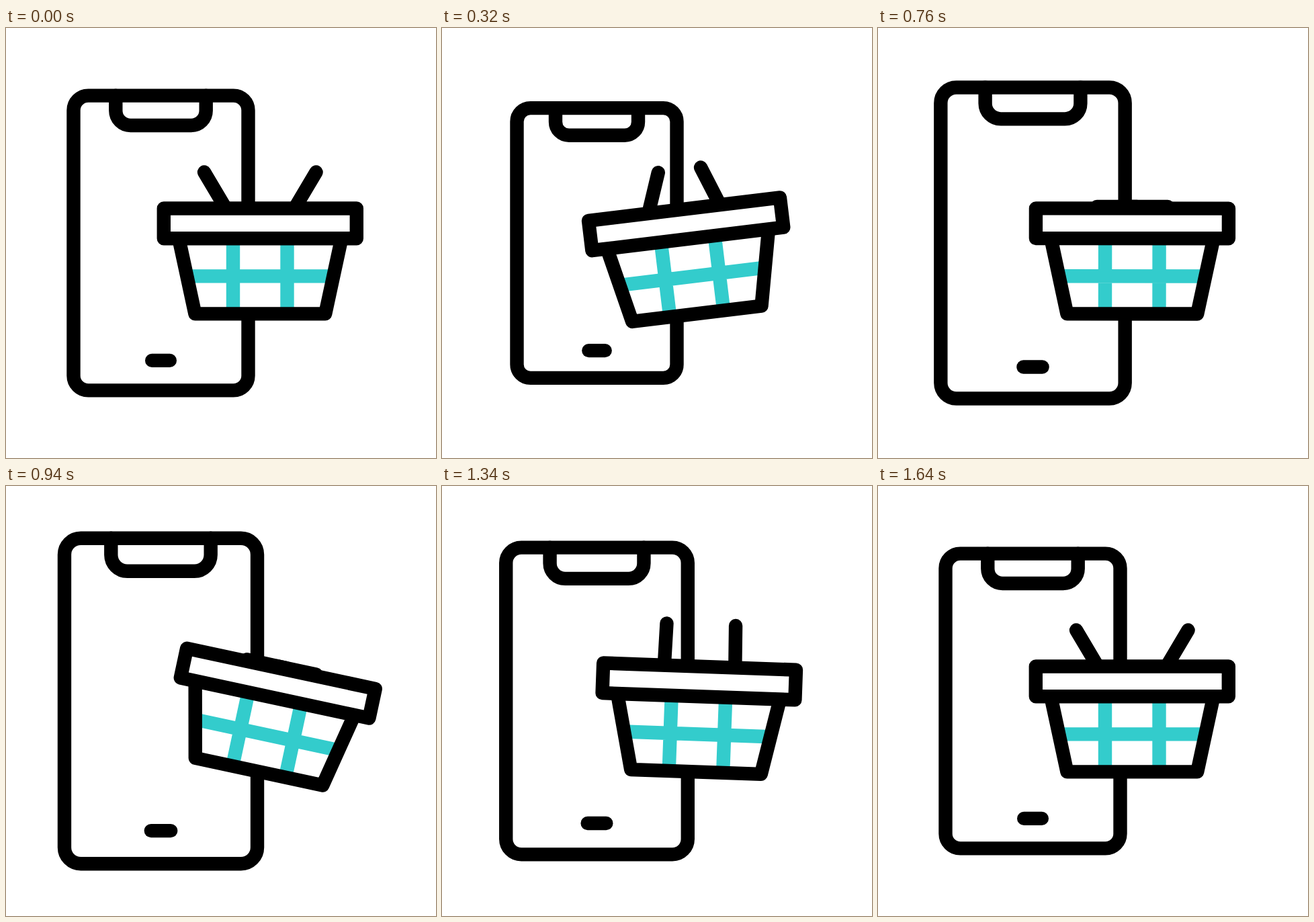
Animation of 640 by 640 pixels, one loop 2 s. Source, as an HTML page:

```html
<!DOCTYPE html>
<html lang="en">
<head>
<meta charset="utf-8">
<title>Mobile shopping</title>
<style>
  html, body { margin: 0; width: 100%; height: 100%; overflow: hidden; background: #fff; }
  svg { display: block; width: 100%; height: 100%; }
  .line { fill: none; stroke: #000; stroke-width: 20.4; stroke-linecap: round; stroke-linejoin: round; }
  .solid { fill: #fff; }
  .grid { fill: none; stroke: #33cccc; stroke-width: 20.4; }
</style>
</head>
<body>
<svg viewBox="0 0 640 640">
  <g id="phone" class="line">
    <rect x="-130" y="-219.4" width="260" height="438.8" rx="22"/>
    <path d="M-67.2-219.4V-197a22 22 0 0 0 22 22H45.2a22 22 0 0 0 22-22V-219.4"/>
    <path d="M-13.3 174.9H13.3"/>
  </g>
  <g id="basket">
    <path id="left" class="line" d="M0 0V-59.9"/>
    <path id="right" class="line" d="M0 0V-59.9"/>
    <path class="solid" d="M257.2 313.3L281.4 425.4H475.2L499.4 313.3Z"/>
    <path class="grid" d="M338 314V425M418.5 314V425M269.5 369.4H487"/>
    <path class="line" d="M257.2 313.3L281.4 425.4H475.2L499.4 313.3"/>
    <rect class="line solid" x="234.8" y="268.5" width="287" height="44.7"/>
  </g>
</svg>
<script>
  const LOOP = 2000, START = 110, END = 1625, STROKE = 20.4, LIFT = 0.17;
  const $ = id => document.getElementById(id);
  const phone = $('phone'), basket = $('basket'), left = $('left'), right = $('right');

  // Smooth 0..1 ramp between times a and b
  function ramp(t, a, b) {
    const u = Math.min(1, Math.max(0, (t - a) / (b - a)));
    return u * u * (3 - 2 * u);
  }

  // Small lift, deep dip, rise to 1, then a decaying cosine until END
  function swing(t, { dip, low, top, settle, period }) {
    if (t >= END) return 0;
    if (t >= settle) {
      const fade = ((END - t) / (END - settle)) ** 0.7;
      return fade * Math.cos(2 * Math.PI * (t - settle) / period);
    }
    return LIFT * ramp(t, 0, START) - (LIFT + dip) * ramp(t, START, low) + (1 + dip) * ramp(t, low, top);
  }

  const phoneSwing = { dip: 1.1, low: 415, top: 914, settle: 978, period: 416 };
  const basketSwing = { dip: 1.29, low: 530, top: 955, settle: 955, period: 483 };

  function draw(t) {
    const scale = 1 + 0.104 * swing(t, phoneSwing);
    const tilt = 12.2 * swing(t, basketSwing);
    const fold = 120.7 * (ramp(t, 90, 605) - ramp(t, 990, 1520)) - 30.7;

    phone.setAttribute('transform', `translate(230.5 320) scale(${scale})`);
    phone.style.strokeWidth = STROKE / scale; // line weight stays constant
    basket.setAttribute('transform', `rotate(${tilt} 378.3 417)`);
    left.setAttribute('transform', `translate(325.6 266) rotate(${fold})`);
    right.setAttribute('transform', `translate(431 266) rotate(${-fold})`);
  }

  const start = performance.now();
  function tick() {
    draw((performance.now() - start) % LOOP);
    requestAnimationFrame(tick);
  }
  draw(0);
  requestAnimationFrame(tick);
</script>
</body>
</html>
```
